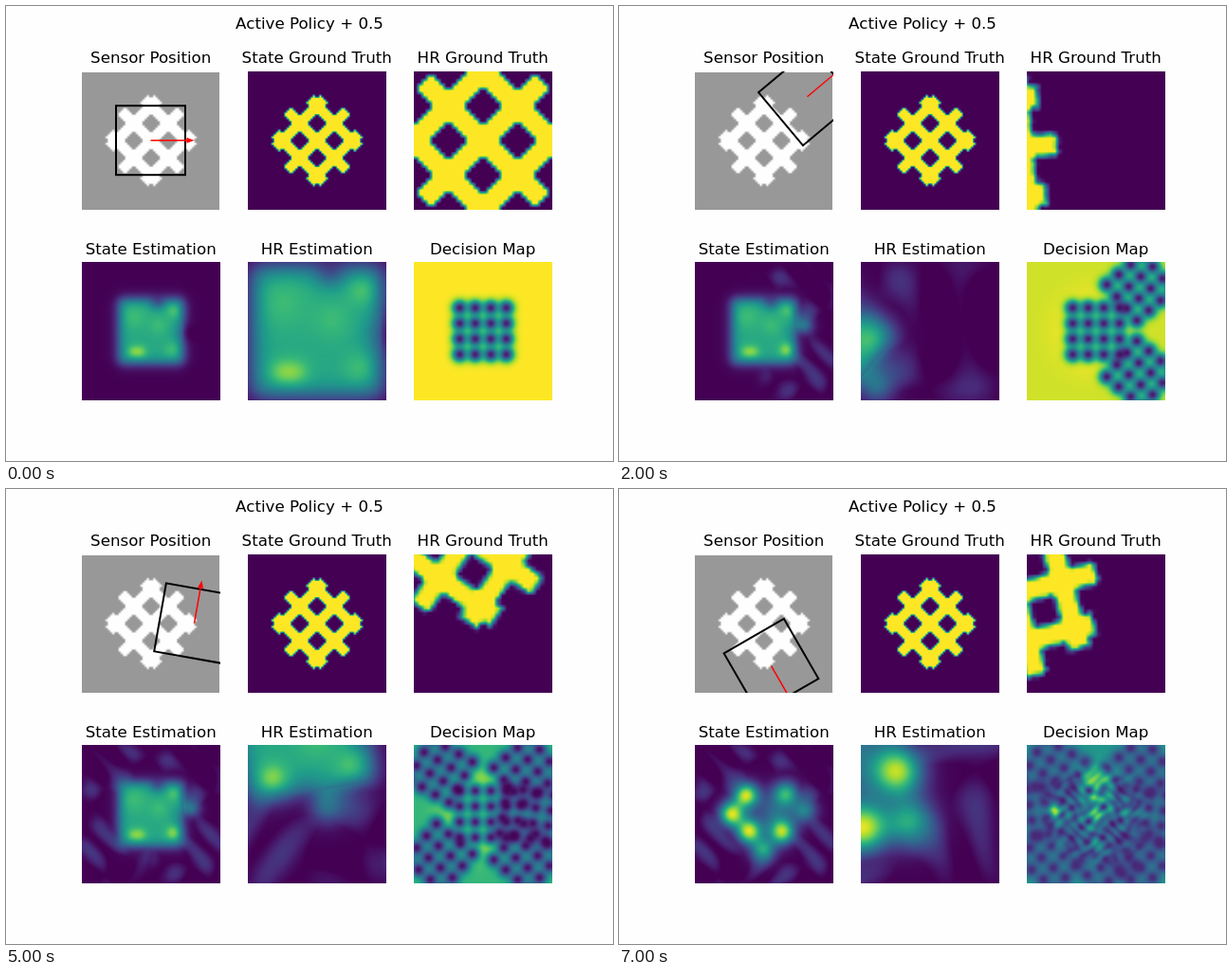
These frames come from a looping animation (640 by 480 pixels, 8000 ms). An HTML page with a canvas:

```html
<!DOCTYPE html>
<html>
<head>
<meta charset="utf-8">
<style>
html, body { margin: 0; width: 100%; height: 100%; overflow: hidden; background: #fefefe; }
canvas { display: block; }
</style>
</head>
<body>
<canvas id="stage" width="640" height="480"></canvas>
<script>
const SIZE = 146, HALF = 73;
const STEP_MS = 1000;
const COLUMNS = [80, 255, 430], ROWS = [69, 270];
const TITLES = ['Sensor Position', 'State Ground Truth', 'HR Ground Truth',
  'State Estimation', 'HR Estimation', 'Decision Map'];

// Sensor pose per step: x, y from the panel centre, heading in degrees
const POSES = [[0, 0, 0], [46, 45, -50], [46, -46, -40], [-46, 45, 40],
  [-45, -46, 30], [46, 0, -80], [-45, -6, 80], [8, 45, 60]]
  .map(([x, y, deg]) => {
    const a = deg * Math.PI / 180;
    return { x, y, a, cos: Math.cos(a), sin: Math.sin(a) };
  });
const BACKGROUND = [1, 1, .93, .84, .76, .66, .56, .5];

const hex = s => [0, 2, 4].map(i => parseInt(s.substr(i, 2), 16));
const VIRIDIS = ['440154', '482878', '3e4a89', '31688e', '26828e', '1f9e89',
  '35b779', '6ece58', 'b5de2b', 'fde725'].map(hex);
const GREY = ['989898', 'fefefe'].map(hex);

const clamp = v => Math.max(0, Math.min(1, v));
function shade(ramp, v) {
  const p = clamp(v) * (ramp.length - 1), i = Math.min(ramp.length - 2, Math.floor(p));
  return ramp[i].map((c, j) => c + (ramp[i + 1][j] - c) * (p - i));
}
const gauss = (dx, dy, s) => {
  const d = (dx * dx + dy * dy) / (2 * s * s);
  return d > 9 ? 0 : Math.exp(-d);
};
const sigmoid = v => 1 / (1 + Math.exp(-v));
const softSquare = (x, y, half, soft) =>
  sigmoid((half - Math.abs(x)) / soft) * sigmoid((half - Math.abs(y)) / soft);
const addBlobs = (list, x, y) =>
  list.reduce((sum, [bx, by, amp, s = 9]) => sum + amp * gauss(x - bx, y - by, s), 0);

function toSensor(pose, x, y) {
  const dx = x - pose.x, dy = y - pose.y;
  return [dx * pose.cos + dy * pose.sin, dy * pose.cos - dx * pose.sin];
}
const zoomed = (field, pose) => (x, y) => {
  const u = x / 2, v = y / 2;
  return field(pose.x + u * pose.cos - v * pose.sin, pose.y + u * pose.sin + v * pose.cos);
};

// Samples a field on n x n cells and interpolates between cell centres
function onGrid(field, n) {
  const size = SIZE / n;
  const cell = (i, j) => field((i + .5) * size - HALF, (j + .5) * size - HALF);
  return (x, y) => {
    const gx = (x + HALF) / size - .5, gy = (y + HALF) / size - .5;
    const i = Math.floor(gx), j = Math.floor(gy), fx = gx - i, fy = gy - j;
    return (cell(i, j) * (1 - fx) + cell(i + 1, j) * fx) * (1 - fy) +
      (cell(i, j + 1) * (1 - fx) + cell(i + 1, j + 1) * fx) * fy;
  };
}

// Diagonal lattice of three bars each way
const bars = (a, b) => Math.abs(a) < 5.9 && Math.abs(b) < 43.6 ||
  Math.abs(Math.abs(a) - 26.3) < 5.9 && Math.abs(b) < 35.6;
function lattice(x, y) {
  const p = (x + y) / Math.SQRT2, q = (x - y) / Math.SQRT2;
  return bars(p, q) || bars(q, p) ? 1 : 0;
}
const truth = onGrid(lattice, 64);

// Estimate: a soft square first, later blobs at the lattice crossings
const EARLY = [[-19, -16, .09, 10], [25, -22, .15, 6], [8, -6, .08, 7], [23, 20, .11, 6],
  [-19, 22, .17, 5], [-11, 22, .17, 5], [7, -32, -.28, 6], [34, 2, -.12, 7]];
const LATE = [[-19, -20, .9], [-34, 0, .92], [-16, 18, .9], [23, -22, .56],
  [43, -4, .4], [12, -2, .32, 16]];
function estimate(step) {
  let list = EARLY;
  if (step > 0) list = list.concat([[24, 20, .14, 5]]);
  if (step > 1) list = list.concat([[42, -6, .38, 7]]);
  if (step > 5) list = LATE.concat(step === 6 ? [[21, 20, .68], [0, 22, .25]]
    : [[19, 19, .78], [-1, 38, .58]]);
  return (x, y) => {
    const inner = softSquare(x, y, 34, 3.3);
    let v = addBlobs(list, x, y);
    if (step < 6) v = v * Math.min(1, inner + (x > 34 ? 1 : 0)) + .6 * inner;
    let seen = 0;
    for (let k = 1; k <= step; k++) {
      const [a, b] = toSensor(POSES[k], x, y);
      seen = Math.max(seen, softSquare(a, b, 36, 4));
    }
    const wisp = Math.sin(x * .11 + 1.3 * Math.sin(y * .07 + 1)) *
      Math.sin(y * .1 + 1.3 * Math.sin(x * .06));
    return v + seen * .16 * Math.max(0, wisp) * (1 - clamp(v * 2));
  };
}

// Uncertainty: each sensor pose leaves a 4 x 4 grid of dark dots
const DOTS = [-24.6, -8.2, 8.2, 24.6];
function decision(step) {
  const base = BACKGROUND[step];
  return (x, y) => {
    const centre = Math.exp(-((Math.hypot(x, y) / 48) ** 4));
    let v = base + (1 - base) * .85 * centre;
    for (let k = 0; k <= step; k++) {
      const [a, b] = toSensor(POSES[k], x, y);
      if (Math.max(Math.abs(a), Math.abs(b)) > 45) continue;
      for (const p of DOTS) for (const q of DOTS) v *= 1 - .92 * gauss(a - p, b - q, 5.5);
    }
    if (step > 5) {
      const ripple = Math.sin(x * .38 + 1.2 * Math.sin(y * .16)) *
        Math.sin(y * .4 + 1.2 * Math.sin(x * .15));
      v = v * .85 + .09 + centre * (.1 + .14 * ripple) + .5 * gauss(x + 43, y + 3, 4);
    }
    return v;
  };
}

const ctx = document.getElementById('stage').getContext('2d');

function paint(g, x0, y0, field, ramp, trim) {
  const image = g.createImageData(SIZE, SIZE);
  for (let j = 0, o = 0; j < SIZE; j++) {
    for (let i = 0; i < SIZE; i++, o += 4) {
      image.data.set(shade(ramp, field(i + .5 - HALF, j + .5 - HALF)), o);
      image.data[o + 3] = 255;
    }
  }
  g.putImageData(image, x0, y0, 0, trim, SIZE - trim, SIZE - trim);
}

function drawSensor(g, pose) {
  g.save();
  g.beginPath();
  g.rect(COLUMNS[0], ROWS[0], SIZE, SIZE);
  g.clip();
  g.translate(COLUMNS[0] + HALF - .5 + pose.x, ROWS[0] + HALF - .3 + pose.y);
  g.rotate(pose.a);
  g.lineWidth = 2;
  g.strokeStyle = '#000';
  g.strokeRect(-36.5, -36.5, 73, 73);
  g.strokeStyle = g.fillStyle = '#f00';
  g.lineWidth = 1.5;
  g.beginPath();
  g.moveTo(0, 0);
  g.lineTo(39, 0);
  g.stroke();
  g.beginPath();
  g.moveTo(46, 0);
  g.lineTo(38, -3);
  g.lineTo(38, 3);
  g.fill();
  g.restore();
}

function buildScene(pose, step) {
  const canvas = document.createElement('canvas');
  canvas.width = 640;
  canvas.height = 480;
  const g = canvas.getContext('2d');
  g.fillStyle = '#fefefe';
  g.fillRect(0, 0, 640, 480);
  const guess = estimate(step);
  const fields = [truth, truth, onGrid(zoomed(truth, pose), 32),
    guess, zoomed(guess, pose), decision(step)];
  g.font = '16.67px "DejaVu Sans", sans-serif';
  g.textAlign = 'center';
  fields.forEach((field, i) => {
    const x = COLUMNS[i % 3], y = ROWS[Math.floor(i / 3)];
    paint(g, x, y, field, i ? VIRIDIS : GREY, i ? 0 : 1);
    g.fillStyle = '#000';
    g.fillText(TITLES[i], x + HALF - .3, y - (y < 100 ? 9 : 8));
  });
  g.fillText('Active Policy + 0.5', 320, 24);
  drawSensor(g, pose);
  return canvas;
}

const scenes = POSES.map(buildScene);
const start = performance.now();
function frame() {
  const step = Math.floor((performance.now() - start) / STEP_MS) % scenes.length;
  ctx.drawImage(scenes[step], 0, 0);
  requestAnimationFrame(frame);
}
frame();
</script>
</body>
</html>
```
